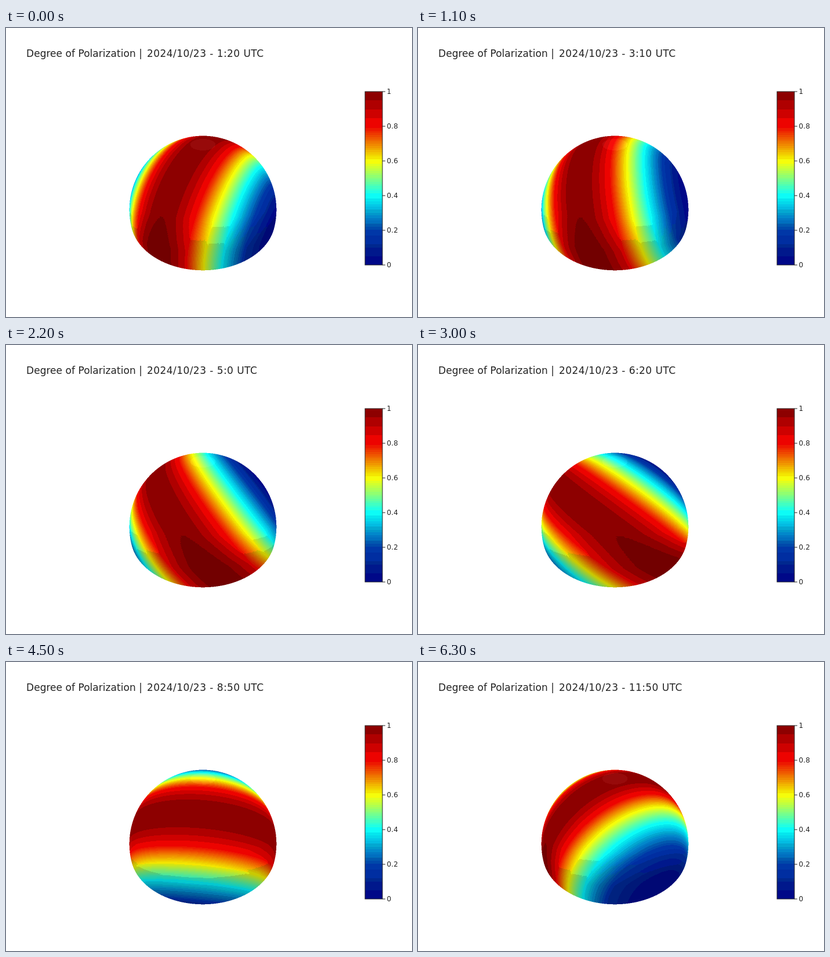
An HTML page with a canvas for the animation above (6400 ms loop, 700 px wide and 500 px high).

```html
<!DOCTYPE html>
<html lang="en">
<head>
<meta charset="utf-8">
<title>Degree of Polarization</title>
<style>
  html, body { margin: 0; width: 100%; height: 100%; overflow: hidden; background: #fff; }
  canvas { display: block; }
</style>
</head>
<body>
<canvas id="stage" width="700" height="500"></canvas>
<script>
const ctx = document.getElementById('stage').getContext('2d');
const INK = 'rgb(36,36,36)';
const RAD = Math.PI / 180;
const clamp = (v, lo, hi) => Math.min(hi, Math.max(lo, v));

// Degree of polarization of Rayleigh-scattered light; c is the cosine of the angle to the sun
const polarization = c => (1 - c * c) / (1 + c * c);

// Jet colour scale with evenly spaced stops
const JET = [[0, 0, 131], [0, 60, 170], [5, 255, 255], [255, 255, 0], [250, 0, 0], [128, 0, 0]];
function jet(d, shade) {
  const i = Math.min(4, Math.floor(d * 5)), f = d * 5 - i;
  return JET[i].map((v, k) => shade * (v + (JET[i + 1][k] - v) * f));
}

// Reduced palette: mean colour of every bucket used by lit and shaded parts
function buildPalette() {
  const buckets = new Map();
  for (const shade of [1, 0.9, 0.8]) {
    for (let i = 0; i <= 2000; i++) {
      const rgb = jet(polarization(i / 2000), shade);
      const key = (rgb[0] >> 5) + ',' + (rgb[1] >> 4) + ',' + (rgb[2] >> 5);
      const b = buckets.get(key) || [0, 0, 0, 0];
      rgb.forEach((v, k) => b[k] += v);
      b[3]++;
      buckets.set(key, b);
    }
  }
  return [...buckets.values()].map(b => b.slice(0, 3).map(v => Math.round(v / b[3])));
}
const palette = buildPalette();

function nearest(rgb) {
  let best, least = Infinity;
  for (const p of palette) {
    const e = (p[0] - rgb[0]) ** 2 + (p[1] - rgb[1]) ** 2 + (p[2] - rgb[2]) ** 2;
    if (e < least) { least = e; best = p; }
  }
  return best;
}

const D_STEPS = 500, SHADES = 40;
const lookup = Array.from({ length: SHADES + 1 }, (_, s) =>
  Array.from({ length: D_STEPS + 1 }, (_, i) => nearest(jet(i / D_STEPS, 0.8 + 0.2 * s / SHADES))));

// Perspective camera over a unit dome: x right, y towards the viewer, z up
const FOCAL = 160 / Math.tan(22.5 * RAD), CX = 339.5, CY = 260;
const SIN = Math.sqrt(1 / 3), COS = Math.sqrt(2 / 3), DIST = 2.918;
const EYE = [DIST * COS, 0.5 + DIST * SIN];

function hitDome(px, py) {
  const u = (px - CX) / FOCAL, v = (CY - py) / FOCAL;
  const dy = -COS - v * SIN, dz = -SIN + v * COS;
  const a = u * u + dy * dy + dz * dz;
  const b = EYE[0] * dy + EYE[1] * dz;
  const disc = b * b - a * (EYE[0] ** 2 + EYE[1] ** 2 - 1);
  if (disc < 0) return null;
  const s = (-b - Math.sqrt(disc)) / a;
  const z = EYE[1] + s * dz;
  return z < 0 ? null : [s * u, EYE[0] + s * dy, z];
}

// Surface point, coverage and shade of each pixel; the light comes from above and behind
const BOX = { x: 210, y: 184, w: 260, h: 238 };
const image = ctx.createImageData(BOX.w, BOX.h);
const pixels = [];
for (let j = 0; j < BOX.h; j++) {
  for (let i = 0; i < BOX.w; i++) {
    const hits = [[0.25, 0.25], [0.75, 0.25], [0.25, 0.75], [0.75, 0.75]]
      .map(([ox, oy]) => hitDome(BOX.x + i + ox, BOX.y + j + oy)).filter(Boolean);
    if (!hits.length) continue;
    const [x, y, z] = hitDome(BOX.x + i + 0.5, BOX.y + j + 0.5) || hits[0];
    const shade = Math.round(SHADES * clamp((z - 0.57 * y + 0.28) / 0.4, 0, 1));
    pixels.push({
      x, y, z, at: 4 * (j * BOX.w + i), cover: hits.length / 4,
      colors: lookup[shade], sheen: z > 0.989 ? 10 : 0
    });
  }
}

const LATITUDE = 38.5 * RAD, DECLINATION = -11.45 * RAD, NOON = 6.62;
function sunAt(hour) {
  const H = (hour - NOON) * 15 * RAD;
  const sd = Math.sin(DECLINATION), cd = Math.cos(DECLINATION);
  const sl = Math.sin(LATITUDE), cl = Math.cos(LATITUDE);
  const north = sd * cl - cd * Math.cos(H) * sl;
  const east = -cd * Math.sin(H);
  const up = sd * sl + cd * Math.cos(H) * cl;
  return [(east - north) * Math.SQRT1_2, (north + east) * Math.SQRT1_2, up];
}

function drawDome(hour) {
  const [sx, sy, sz] = sunAt(hour), data = image.data;
  for (const p of pixels) {
    const d = polarization(p.x * sx + p.y * sy + p.z * sz);
    const rgb = p.colors[Math.round(clamp(d, 0, 1) * D_STEPS)];
    for (let k = 0; k < 3; k++) {
      data[p.at + k] = 255 + (Math.min(255, rgb[k] + p.sheen) - 255) * p.cover;
    }
    data[p.at + 3] = 255;
  }
  ctx.putImageData(image, BOX.x, BOX.y);
}

function text(str, x, y, size, spacing) {
  ctx.font = size + 'px Verdana, "DejaVu Sans", sans-serif';
  ctx.letterSpacing = spacing + 'px';
  ctx.fillStyle = INK;
  ctx.fillText(str, x, y);
}

function drawColorbar() {
  for (let y = 0; y < 300; y++) {
    const d = 1 - (y + 0.5) / 300;
    ctx.fillStyle = `rgb(${lookup[SHADES][Math.round(d * D_STEPS)]})`;
    ctx.fillRect(619, 110 + y, 30, 1);
  }
  ctx.strokeStyle = INK;
  ctx.strokeRect(619, 110, 30, 300);
  ['1', '0.8', '0.6', '0.4', '0.2', '0'].forEach((label, i) => {
    ctx.fillStyle = INK;
    ctx.fillRect(649, 109.5 + i * 60, 5, 1);
    text(label, 656.5, 114.3 + i * 60, 12, 0.2);
  });
}

const STEP = 100, STEPS = 64;
let shown = -1;
function frame(now) {
  const step = Math.floor(now / STEP) % STEPS;
  if (step !== shown) {
    shown = step;
    const minutes = 80 + step * 10;
    ctx.fillStyle = '#fff';
    ctx.fillRect(0, 0, 700, 500);
    drawDome(minutes / 60);
    drawColorbar();
    const clock = Math.floor(minutes / 60) + ':' + minutes % 60;
    text('Degree of Polarization |', 35, 50, 17, 0.04);
    text(`2024/10/23 - ${clock} UTC`, 243, 50, 17, 0.44);
  }
  requestAnimationFrame(frame);
}
frame(performance.now());
</script>
</body>
</html>
```
